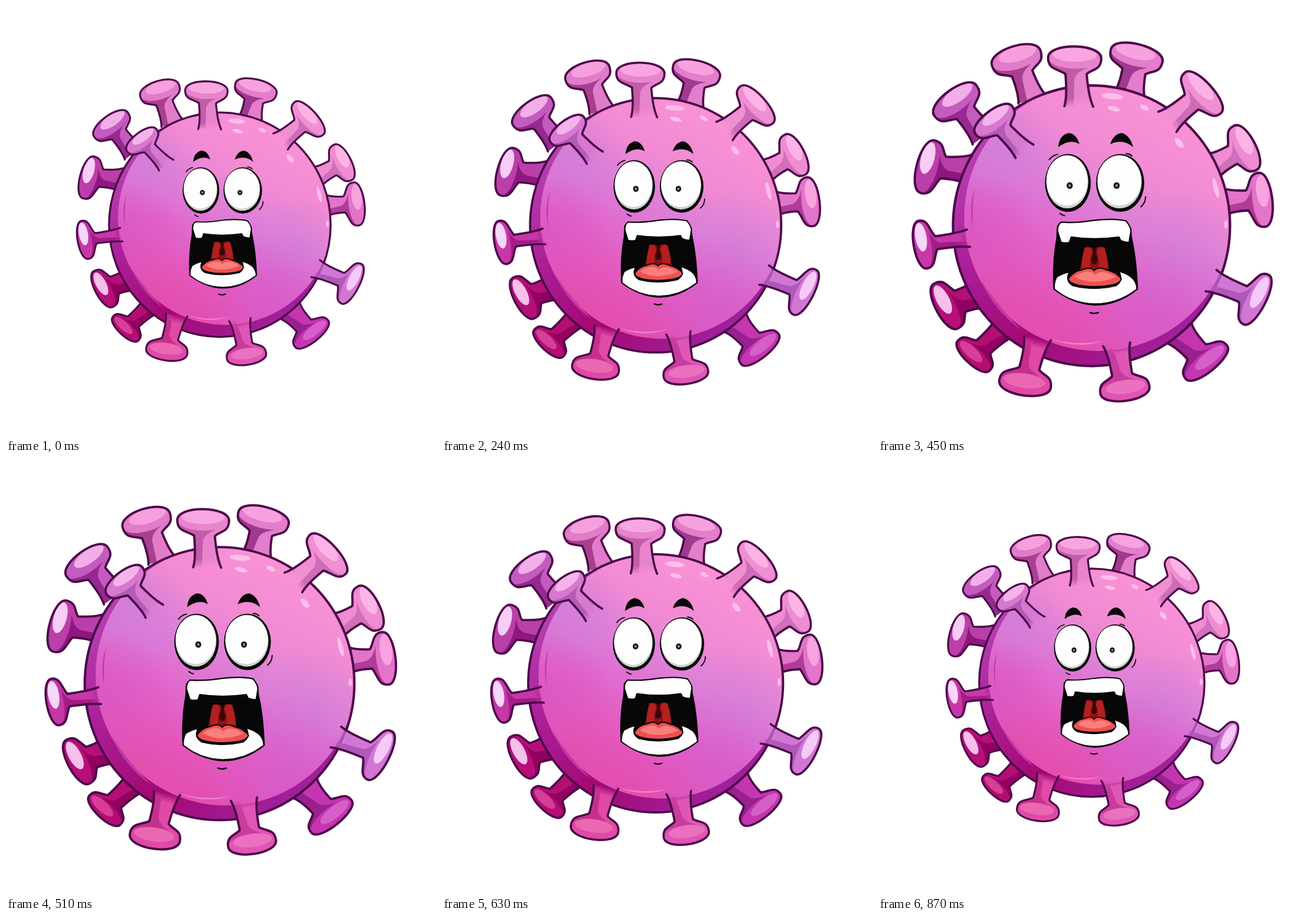
These frames come from a looping animation (748x748 px, 0.9 s). An HTML page with a canvas:

```html
<!DOCTYPE html>
<html lang="en">
<head>
<meta charset="utf-8">
<title>Scared virus</title>
<style>
html, body { margin: 0; width: 100%; height: 100%; overflow: hidden; background: #fff; }
canvas { display: block; width: 748px; height: 748px; }
</style>
</head>
<body>
<canvas id="stage" width="748" height="748"></canvas>
<script>
const ctx = document.getElementById('stage').getContext('2d');
const INK = '#4c0a4a';
const CENTER = { x: 374.3, y: 373.3 };
const STEP = 30, STEPS = 30, GROWTH = 0.25;
const DRAWN_SCALE = 1 + GROWTH * 13 / 15;

// head x, y, tilt, root x, y, cap half width, cap half height, stalk half width, colours
const backSpikes = [
  [244, 98, -17, 271, 168, 43, 21, 18, '#e07cca', '#f79fdd', '#a8408f'],
  [448, 94, 14, 436, 162, 45, 20, 20, '#e27ecb', '#f7a2de', '#a03a90'],
  [632, 250, 63, 576, 281, 42, 18, 17, '#f08cd2', '#fcb4e7', '#d070ba'],
  [660, 338, 83, 596, 341, 46, 18, 17, '#e274ca', '#f8a2df', '#b03c98'],
  [566, 613, 141, 520, 564, 45, 17, 20, '#c436b0', '#d55fc8', '#98208f'],
  [172, 602, -137, 224, 555, 37, 15, 16, '#b40e72', '#d63f98', '#940062'],
  [125, 518, -118, 184, 498, 43, 18, 20, '#b50f78', '#f6c0ea', '#90005f'],
  [94, 282, -75, 164, 286, 46, 19, 19, '#bb3fa8', '#f6cdf4', '#8e1780'],
  [141, 170, -36, 190, 230, 44, 20, 18, '#c45cbf', '#f1aee9', '#96298f']
];
const frontSpikes = [
  [343, 98, 1, 350, 180, 45, 20, 18, '#e884cb', '#f8a6df', '#c25ca8'],
  [560, 157, 48, 500, 206, 46, 18, 17, '#f08fd1', '#fcb2e5', '#cf6cb8'],
  [650, 507, 117, 574, 475, 47, 17, 15, '#d276d3', '#f5caf8', '#b058b8'],
  [428, 660, 172, 414, 583, 42, 19, 17, '#e056b4', '#ea70c0', '#c83c9e'],
  [259, 650, 188, 280, 573, 44, 20, 17, '#e04aa6', '#ea68b2', '#c5308c'],
  [86, 414, -100, 163, 403, 41, 16, 11, '#c638a8', '#f8d6f9', '#a41c86'],
  [206, 203, -37, 258, 256, 39, 17, 14, '#d878d0', '#f4b3ea', '#b45cb4']
];

function shape(d, fill, stroke, width) {
  const path = new Path2D(d);
  if (fill) { ctx.fillStyle = fill; ctx.fill(path); }
  if (stroke) { ctx.strokeStyle = stroke; ctx.lineWidth = width; ctx.stroke(path); }
}

function oval(x, y, rx, ry, fill, degrees = 0) {
  ctx.beginPath();
  ctx.ellipse(x, y, rx, ry, degrees * Math.PI / 180, 0, 2 * Math.PI);
  ctx.fillStyle = fill;
  ctx.fill();
}

function linear(x0, y0, x1, y1, ...stops) {
  const g = ctx.createLinearGradient(x0, y0, x1, y1);
  stops.forEach(([at, color]) => g.addColorStop(at, color));
  return g;
}

function glow(x, y, r, color) {
  const g = ctx.createRadialGradient(x, y, 0, x, y, r);
  g.addColorStop(0, color + 'cc');
  g.addColorStop(1, color + '00');
  ctx.fillStyle = g;
  ctx.fillRect(x - r, y - r, 2 * r, 2 * r);
}

function spike([x, y, tilt, rootX, rootY, w, b, sw, color, face, shade], inFront) {
  const a = tilt * Math.PI / 180, cos = Math.cos(a), sin = Math.sin(a);
  const dx = rootX - x, dy = rootY - y;
  const bx = dx * cos + dy * sin, by = dy * cos - dx * sin;
  const ny = b + 7, nx = bx * ny / by;
  const flare = sw * 1.35;
  // the shaded half of a stalk is the one turned to the lower left
  const side = -0.6 * cos + 0.8 * sin > 0 ? 1 : -1;
  const fade = c => linear(0, 0, bx, by, [0, c], [0.8, c], [1, c + (inFront ? '00' : '')]);

  ctx.save();
  ctx.translate(x, y);
  ctx.rotate(a);
  const outline = new Path2D(
    `M${bx - flare},${by} Q${bx * 0.8 - sw},${by * 0.8} ${nx - sw},${ny}
     C${-sw - 12},${b * 0.9} ${-w},${b} ${-w},0
     C${-w},${-b * 1.3} ${w},${-b * 1.3} ${w},0
     C${w},${b} ${sw + 12},${b * 0.9} ${nx + sw},${ny}
     Q${bx * 0.8 + sw},${by * 0.8} ${bx + flare},${by}`);
  ctx.fillStyle = fade(color);
  ctx.fill(outline);

  ctx.save();
  ctx.clip(outline);
  const edge = side * w, mid = side * sw * 0.15;
  shape(`M${edge},0 L${-edge * 0.5},${b * 0.8}
         Q${nx + mid},${ny - 2} ${nx + mid},${ny + 12}
         L${bx + side * sw * 0.5},${by} L${bx + side * flare},${by} L${edge},${ny}Z`, fade(shade));
  oval(0, 0, w, b * 0.9, color);
  oval(-0.32 * w * sin, -b * 0.28 * cos - b * 0.12 * Math.abs(sin),
       w * (0.84 - 0.25 * Math.abs(sin)), b * 0.6, face);
  ctx.restore();

  ctx.strokeStyle = INK;
  ctx.lineWidth = 4;
  ctx.stroke(outline);
  ctx.restore();
}

function body() {
  const disc = new Path2D();
  disc.ellipse(371.5, 382, 234.5, 237.5, 0, 0, 2 * Math.PI);
  ctx.save();
  ctx.clip(disc);
  ctx.fillStyle = linear(170, 260, 470, 600,
    [0, '#b440b0'], [0.3, '#ab1f98'], [0.65, '#a40872'], [1, '#a0209a']);
  ctx.fillRect(130, 140, 485, 485);

  const lit = new Path2D();
  lit.ellipse(383, 367, 227, 227, 0, 0, 2 * Math.PI);
  ctx.clip(lit);
  // a lavender band runs across the disc between pink and magenta
  ctx.fillStyle = linear(477, 169, 273, 547,
    [0, '#fa92d5'], [0.28, '#f18ad3'], [0.46, '#de80d8'],
    [0.62, '#e06ccf'], [0.85, '#e456ba'], [1, '#e24fae']);
  ctx.fillRect(130, 140, 485, 485);
  glow(215, 260, 110, '#d27cd8');
  glow(530, 425, 110, '#d482d8');
  glow(490, 545, 150, '#d45ccb');
  glow(180, 400, 110, '#da58c4');
  ctx.restore();

  const streak = '#bd3aa6';
  shape('M174,318 Q163,352 171,386 Q168,350 174,318Z', streak);
  shape('M184,475 Q206,525 252,558 Q215,520 184,475Z', streak);
  shape('M300,573 Q345,586 392,577 Q348,592 300,573Z', '#f07fca');

  const shine = '#fcbfe9';
  oval(407, 163, 18, 5, shine, 5);
  oval(461, 182, 8, 4, shine, 25);
  oval(409, 184, 11, 4, shine, 14);
  oval(520, 242, 5, 10, shine, -40);
  oval(582, 318, 4, 17, shine, -14);
  oval(599, 380, 3, 7, shine);

  ctx.strokeStyle = INK;
  ctx.lineWidth = 4.2;
  ctx.stroke(disc);
}

function eye(x, y, rx, ry, pupilX) {
  oval(x + 0.5, y + 0.5, rx + 1.8, ry + 3, '#080808');
  oval(x - 0.5, y - 1.5, rx - 1.5, ry - 1, '#d2d2d2');
  oval(x - 1, y - 3.5, rx - 2, ry - 3.5, '#fdfdfd');
  oval(pupilX, 314, 5.2, 5.6, '#161616');
  oval(pupilX, 314, 2.2, 2.5, '#8b8b8b');
}

function mouth() {
  const black = '#070707';
  shape(`M320,376 Q345,378 376,373 Q410,369 430,374 L438,388 Q438,400 440,407
         Q447,440 449,489 Q416,516 377,516 Q340,514 308,489 Q306,440 313,404 L314,383Z`,
        black, black, 2.5);
  // throat
  shape('M359,419 Q368,416 376,421 Q386,415 394,419 L401,457 L352,457Z', '#8a1214');
  shape('M361,420 Q370,416 373,426 Q368,436 369,454 L355,453 Q355,434 361,420Z', '#b3201f');
  shape('M393,420 Q384,416 380,426 Q385,436 384,454 L400,453 Q399,434 393,420Z', '#b3201f');
  shape('M373,420 L380,420 Q378,430 382,438 Q382,447 376,447 Q370,447 371,438 Q375,430 373,420Z', '#3b0505');
  // lower teeth
  shape(`M313,469 Q325,462 333,461 Q326,476 340,484 Q375,493 413,484
         Q426,476 419,460 Q430,463 438,469 Q447,476 448,489
         Q416,514 377,514 Q338,513 309,489 Q308,479 313,469Z`, '#fff', black, 1);
  // tongue
  shape(`M332,472 Q342,458 355,457 Q369,450 376,458 Q383,450 397,457
         Q413,460 422,472 Q419,484 376,485 Q336,484 332,472Z`, '#ee5054', black, 2);
  shape(`M342,468 Q361,455 374,462 L377,465 Q391,454 413,469
         Q394,477 376,477 Q356,477 342,468Z`, '#fb7f7a');
  // upper teeth
  shape(`M320,376 Q345,378 376,373 Q410,369 430,374 Q439,385 438,392
         L435,410 Q427,410 421,407 L418,401 Q376,407 337,401 L334,410
         Q328,412 320,410 L314,391 Q314,380 320,376Z`, '#fff', black, 2);
}

function face() {
  const black = '#080808';
  shape('M315,249 Q317,228 333,225 Q346,226 351,244 Q336,234 315,249Z', black);
  shape('M403,244 Q409,226 423,225 Q437,229 442,249 Q425,234 403,244Z', black);
  eye(331, 309, 37, 46, 334.5);
  eye(419.5, 309, 39, 46, 414);
  shape('M300,270 Q305,263 314,261 M430,260 Q436,260 440,264', null, black, 2);
  shape('M455,350 Q463,343 463,333 M318,361 Q321,364 326,365', null, black, 2);
  mouth();
  shape('M369,529 Q376,532 383,529', null, black, 2.5);
}

function draw(time) {
  const step = Math.floor(time / STEP) % STEPS;
  const rise = Math.min(step, STEPS - step) / 15;
  const scale = (1 + GROWTH * rise) / DRAWN_SCALE;

  ctx.setTransform(1, 0, 0, 1, 0, 0);
  ctx.fillStyle = '#fff';
  ctx.fillRect(0, 0, 748, 748);
  ctx.translate(CENTER.x, CENTER.y);
  ctx.scale(scale, scale);
  ctx.translate(-CENTER.x, -CENTER.y);
  ctx.lineJoin = ctx.lineCap = 'round';

  backSpikes.forEach(s => spike(s, false));
  body();
  frontSpikes.forEach(s => spike(s, true));
  face();
}

function loop(time) {
  draw(Math.max(0, time));
  requestAnimationFrame(loop);
}
draw(0);
requestAnimationFrame(loop);
</script>
</body>
</html>
```
